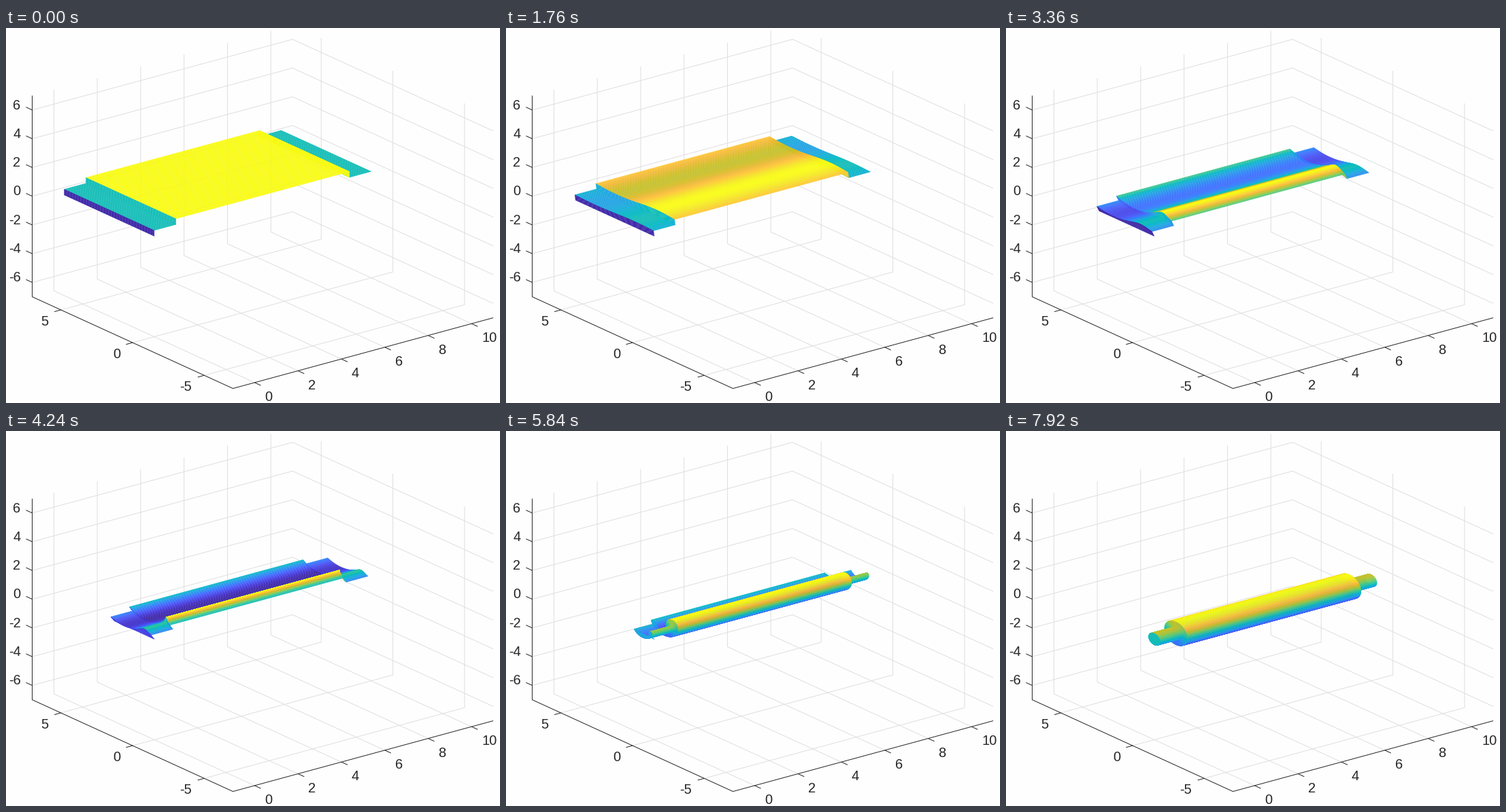
Write a matplotlib script that moves like this. It is 726 px wide and 552 px high and loops after 8 s.

```python
import numpy as np
import matplotlib.pyplot as plt
from matplotlib.animation import FuncAnimation
from matplotlib.collections import LineCollection, PolyCollection
from matplotlib.colors import LinearSegmentedColormap

W, H, DPI = 726, 552, 100
PX = 72 / DPI
FRAMES, INTERVAL = 100, 80
INK, GRID, PAPER = "#262626", "#dfdfdf", "#fefefe"

# Screen vectors of one unit along each axis
ORIGIN = np.array([217.9, 306.4])
EX = np.array([31.88, -8.67])
EY = np.array([-21.07, -9.64])
EZ = np.array([0, -21.15])

X0, X1, LIM = -1, 11, 7
XT, YT, ZT = range(0, 11, 2), (-5, 0, 5), range(-6, 7, 2)

CMAP = LinearSegmentedColormap.from_list("sheet", [
    "#3e26a8", "#4332cb", "#4741e5", "#4852f4", "#4563fd", "#3875fe",
    "#2e87f7", "#2797eb", "#20a5e3", "#12b1d6", "#02bac3", "#24c1ae",
    "#37c897", "#57cc7a", "#81cc59", "#abc739", "#d1bf27", "#f0ba36",
    "#fec338", "#fad62d", "#f5e924", "#f9fb15"], N=256)

# Shaft profile: radius along x
PROFILE_X = [0, 0, 1, 1, 9, 9, 10]
PROFILE_R = np.array([0, 0.4, 0.4, 0.8, 0.8, 0.4, 0.4])
THETA = np.linspace(0, 2 * np.pi, 101)


def project(x, y, z):
    x, y, z = (np.asarray(v, float)[..., None] for v in (x, y, z))
    return ORIGIN + x * EX + y * EY + z * EZ


fig = plt.figure(figsize=(W / DPI, H / DPI), dpi=DPI, facecolor=PAPER)
ax = fig.add_axes([0, 0, 1, 1])
ax.set_xlim(0, W)
ax.set_ylim(H, 0)
ax.axis("off")


def path(*points):
    return np.array([project(*p) for p in points])


def add_lines(lines, color, z):
    ax.add_collection(LineCollection(lines, colors=color, linewidths=PX, zorder=z))


def add_ticks(values, place, direction, offset, align):
    step = 10 * direction / np.hypot(*direction)
    lines = []
    for v in values:
        p = project(*place(v))
        lines.append([p, p + step])
        ax.text(p[0] + offset[0], p[1] + offset[1], str(v), color=INK,
                family="Liberation Sans", fontsize=20 * PX, ha=align,
                va="baseline", zorder=3)
    add_lines(lines, INK, 3)


def draw_axes():
    grid = [path((x, LIM, LIM), (x, LIM, -LIM), (x, -LIM, -LIM)) for x in XT]
    grid += [path((X1, y, LIM), (X1, y, -LIM), (X0, y, -LIM)) for y in YT]
    grid += [path((X0, LIM, z), (X1, LIM, z), (X1, -LIM, z)) for z in ZT]
    add_lines(grid, GRID, 1)
    add_lines([path((X0, LIM, LIM), (X0, LIM, -LIM), (X0, -LIM, -LIM),
                    (X1, -LIM, -LIM))], INK, 3)
    add_ticks(XT, lambda v: (v, -LIM, -LIM), -EY, (15, 27), "left")
    add_ticks(YT, lambda v: (X0, v, -LIM), -EX, (-18, 22.6), "right")
    add_ticks(ZT, lambda v: (X0, LIM, v), EY, (-17, -1.1), "right")


draw_axes()
sheet = PolyCollection([], linewidths=0.35 * PX, zorder=2)
ax.add_collection(sheet)


def update(k):
    s = k / (FRAMES - 1)
    t = s * s * (3 - 2 * s)
    r = PROFILE_R[:, None]
    y = (1 - t) * THETA + t * r * np.cos(THETA)
    z = (1 - t) * r + t * r * np.sin(THETA)
    shade = (z - z.min()) / (z.max() - z.min())

    quads, colors = [], []
    # Far x bands first, then far strips first within each band
    for i in reversed(range(len(PROFILE_X) - 1)):
        a = project(np.full(THETA.size, PROFILE_X[i]), y[i], z[i])
        b = project(np.full(THETA.size, PROFILE_X[i + 1]), y[i + 1], z[i + 1])
        band = np.stack([a[:-1], a[1:], b[1:], b[:-1]], axis=1)
        near = 0.0357 * z[i:i + 2] - 0.0491 * y[i:i + 2]
        order = np.argsort((near[:, :-1] + near[:, 1:]).sum(axis=0), kind="stable")
        quads.append(band[order])
        colors.append(CMAP(shade[i, :-1][order]))
    colors = np.concatenate(colors)
    sheet.set_verts(np.concatenate(quads))
    sheet.set_facecolor(colors)
    sheet.set_edgecolor(colors)
    return [sheet]


anim = FuncAnimation(fig, update, frames=FRAMES, interval=INTERVAL,
                     repeat=True, repeat_delay=0, blit=False)
plt.show()
```
